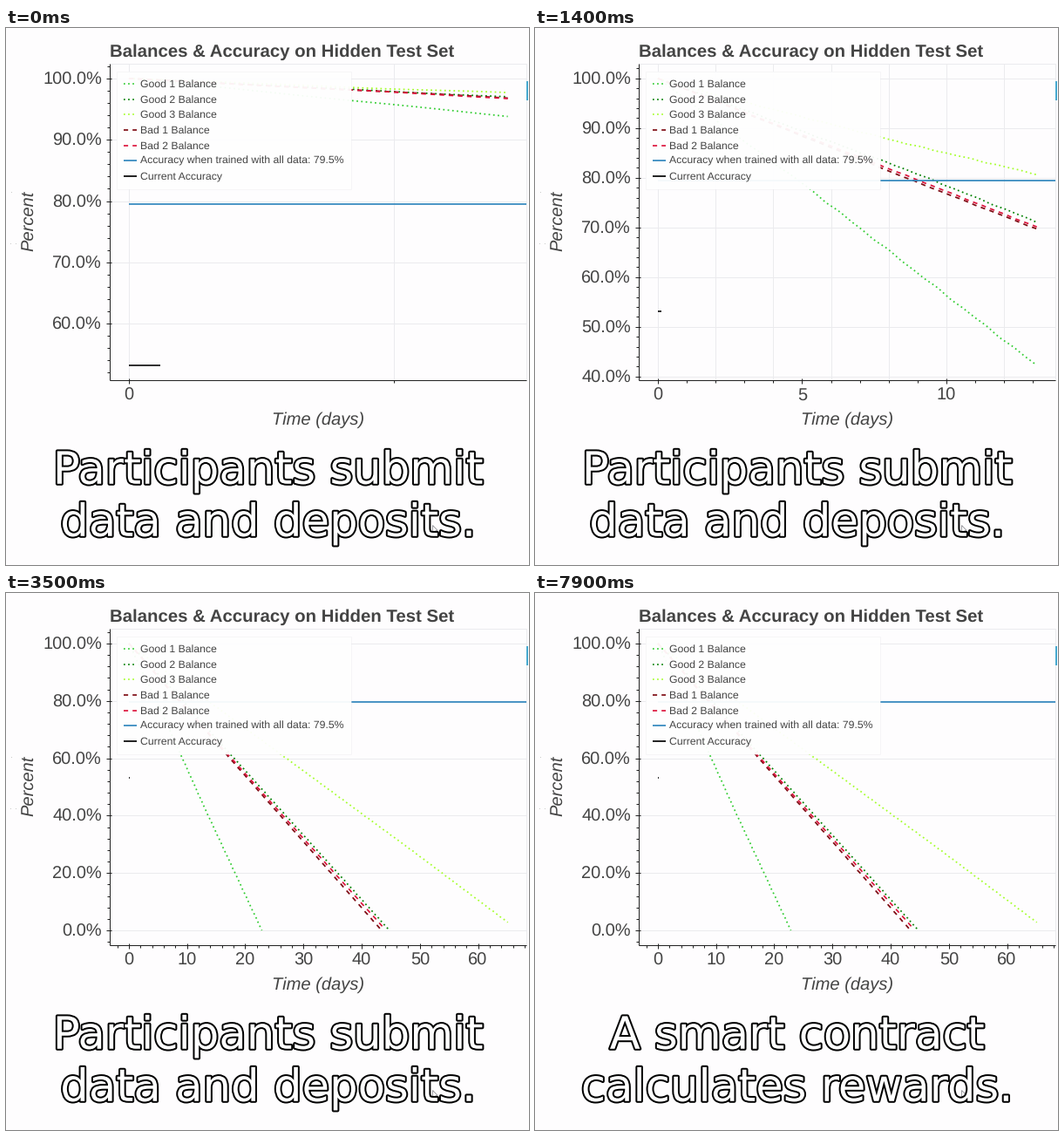
Write a matplotlib script that moves like this. It is 600 px wide and 616 px high and loops after 8 s.

```python
import numpy as np
import matplotlib.pyplot as plt
from matplotlib.animation import FuncAnimation
from matplotlib.patches import Polygon, Rectangle
from matplotlib.patheffects import withStroke

W, H, DPI = 600, 616, 100
FRAMES, STEP = 80, 100
LEFT, RIGHT, TOP, BOTTOM = 119.2, 597.4, 41.4, 403.5
INK, GRID = "#444444", "#ebebee"
PT = 72 / DPI
DOTS, DASHES = (0, (1, 2)), (0, (3, 3))
FULL_ACC, ACC, ACC_DAYS = 79.5, 53.2, 0.119

# name, colour, dash pattern, days, percent, wiggle
SERIES = [
    ("Good 1", "limegreen", DOTS, [0, 1.43, 5, 8.59, 13.13, 22.85],
     [100, 93.9, 78.9, 62.7, 42.2, 0], 0.08),
    ("Good 2", "green", DOTS, [0, 1.43, 8.59, 13.13, 44.6],
     [100, 97.0, 81.7, 71.1, 0.4], 0.05),
    ("Good 3", "#a4ff2a", DOTS, [0, 1.43, 8.59, 13.13, 48.8, 65.1],
     [100, 97.6, 86.9, 80.7, 27.6, 2.8], 0.05),
    ("Bad 1", "#7d0a12", DASHES, [0, 1.43, 8.59, 13.13, 43.25],
     [100, 96.8, 80.0, 69.7, 0.4], 0.03),
    ("Bad 2", "crimson", DASHES, [0, 1.43, 8.59, 13.13, 44.0],
     [100, 96.75, 80.5, 70.1, 0.4], 0.03),
]
BLUE = "#2f86bd"

CAPTIONS = [
    (0, 48, "Participants submit", "data and deposits."),
    (64, FRAMES, "A smart contract", "calculates rewards."),
]

plt.rcParams["font.family"] = "Liberation Sans"
plt.rcParams["text.hinting"] = "none"

fig = plt.figure(figsize=(W / DPI, H / DPI), dpi=DPI, facecolor="#fefdfe")
ax = fig.add_axes([0, 0, 1, 1])
ax.set_xlim(0, W)
ax.set_ylim(H, 0)
ax.axis("off")

live = []


def line(x, y, color, width=1.0, style="-", z=2):
    return ax.plot(x, y, color=color, lw=width * PT, ls=style, zorder=z,
                   solid_capstyle="butt", dash_capstyle="butt")[0]


def label(x, y, s, size, ha="left", z=6, **kw):
    kw.setdefault("color", INK)
    return ax.text(x, y, s, fontsize=size * PT, ha=ha, va="baseline",
                   zorder=z, **kw)


def draw_static():
    label(119.3, 33, "Balances & Accuracy on Hidden Test Set", 20.4,
          weight="bold")
    label(358.5, 455, "Time (days)", 20.1, "center", style="italic")
    label(31.5, 221.5, "Percent", 20.1, "center", style="italic",
          rotation=90, rotation_mode="anchor")

    line([LEFT, RIGHT, RIGHT], [TOP, TOP, BOTTOM], GRID, z=1)
    line([LEFT, LEFT], [TOP, BOTTOM], "#222222", z=5)
    line([LEFT, RIGHT], [BOTTOM, BOTTOM], "#222222", z=5)
    ax.add_patch(Rectangle((597, 60.5), 2, 22.5, fc="#45a9cf", lw=0,
                           zorder=6))
    for x, y in [(6, 188), (5, 247), (11, 247)]:
        ax.add_patch(Rectangle((x, y), 1, 1, fc="#cccccc", lw=0))

    ax.add_patch(Rectangle((127, 49.5), 268.5, 135.5, fc="white", alpha=0.95,
                           lw=0, zorder=4))
    ax.add_patch(Rectangle((127, 49.5), 268.5, 135.5, fc="none", ec=GRID,
                           alpha=0.5, lw=0.8 * PT, zorder=4))
    rows = [(n + " Balance", c, d) for n, c, d, *_ in SERIES]
    rows += [("Accuracy when trained with all data: 79.5%", BLUE, "-"),
             ("Current Accuracy", "black", "-")]
    for k, (name, color, style) in enumerate(rows):
        y = 64.2 + 17.6 * k
        line([134.7, 150], [y, y], color, 1.7, style, z=5)
        label(154, y + 3.8, name, 12.3)

    cursor = [(489.5, 570.5), (489.5, 579), (491.4, 577.3), (492.8, 580),
              (494, 579.3), (492.8, 576.8), (495, 576.3)]
    ax.add_patch(Polygon(cursor, fc="white", ec="#8a8a90", lw=0.8 * PT,
                         zorder=6))


def tick_step(span, least=0.0):
    """Step of the form 1, 2 or 5 times ten that gives about six ticks."""
    steps = [m * 10.0 ** e for e in range(-1, 3) for m in (1, 2, 5)]
    return min((s for s in steps if s >= least),
               key=lambda s: abs(6 - span / s))


def ticks(lo, hi, step):
    return step * np.arange(np.ceil(lo / step), np.floor(hi / step) + 1)


def grid_step(days):
    if days < 3:
        return 1
    if days < 20:
        return 2
    return 5 if days < 52 else None


def elapsed(i):
    return np.exp(np.interp(i, [0, 11, 14, 21, 22.6],
                            np.log([1.43, 8.59, 13.13, 48.8, 65.1])))


def balances(now):
    for k, (_, color, style, days, pct, wig) in enumerate(SERIES):
        end = min(now, days[-1])
        d = np.append(np.arange(0, end, 0.1), end)
        fade = np.clip(np.minimum(d, days[-1] - d), 0, 1)
        wave = np.sin(4.1 * d + k) + np.sin(7.3 * d + 2 * k)
        yield color, style, d, np.interp(d, days, pct) + wig * fade * wave


def draw_axes(px, py, x0, x1, y0, y1, now):
    ystep, xstep = tick_step(y1 - y0), tick_step(x1 - x0, 5)
    for v in ticks(y0, y1, ystep):
        y = py(v)
        live.append(line([LEFT, RIGHT], [y, y], GRID, z=1))
        live.append(line([LEFT - 4.6, LEFT + 1.6], [y, y], "#222222", z=5))
        live.append(label(110, y + 6.8, f"{abs(v):.1f}%", 20, "right"))
    for v in ticks(y0, y1, ystep / 5):
        live.append(line([LEFT - 3, LEFT], [py(v)] * 2, "#222222", z=5))

    gstep = grid_step(now)
    if gstep:
        for v in ticks(x0, x1, gstep):
            live.append(line([px(v)] * 2, [TOP, BOTTOM], GRID, z=1))
    for v in ticks(x0, x1, xstep):
        x = px(v)
        live.append(line([x, x], [BOTTOM - 1.6, BOTTOM + 4.6], "#222222", z=5))
        live.append(label(x, 427, f"{abs(v):.0f}", 20, "center"))
    for v in ticks(x0, x1, xstep / 5):
        live.append(line([px(v)] * 2, [BOTTOM, BOTTOM + 3], "#222222", z=5))


def draw_captions(i):
    edge = [withStroke(linewidth=4 * PT, foreground="black")]
    for start, stop, *rows in CAPTIONS:
        if start <= i < stop:
            for y, row in zip((522.8, 582.8), rows):
                live.append(label(300.5, y, row, 51.3, "center", z=8,
                                  family="DejaVu Sans", color="white",
                                  path_effects=edge))


def draw(i):
    while live:
        live.pop().remove()
    now = elapsed(i)
    curves = list(balances(now))
    low = max(0, min([ACC] + [p.min() for *_, p in curves]))
    padx, pady = 0.05 * now, 0.05 * (100 - low)
    x0, x1, y0, y1 = -padx, now + padx, low - pady, 100 + pady

    def px(v):
        return LEFT + (v - x0) / (x1 - x0) * (RIGHT - LEFT)

    def py(v):
        return BOTTOM - (v - y0) / (y1 - y0) * (BOTTOM - TOP)

    draw_axes(px, py, x0, x1, y0, y1, now)
    for color, style, d, p in curves:
        live.append(line(px(d), py(p), color, 1.75, style, z=3))
    live.append(line([px(0), RIGHT], [py(FULL_ACC)] * 2, BLUE, 1.7, z=3))
    live.append(line([px(0), px(ACC_DAYS)], [py(ACC)] * 2, "black", 1.6, z=3))
    draw_captions(i)
    return live


draw_static()
anim = FuncAnimation(fig, draw, frames=FRAMES, interval=STEP,
                     init_func=lambda: draw(0), repeat=True, repeat_delay=0)
plt.show()
```
